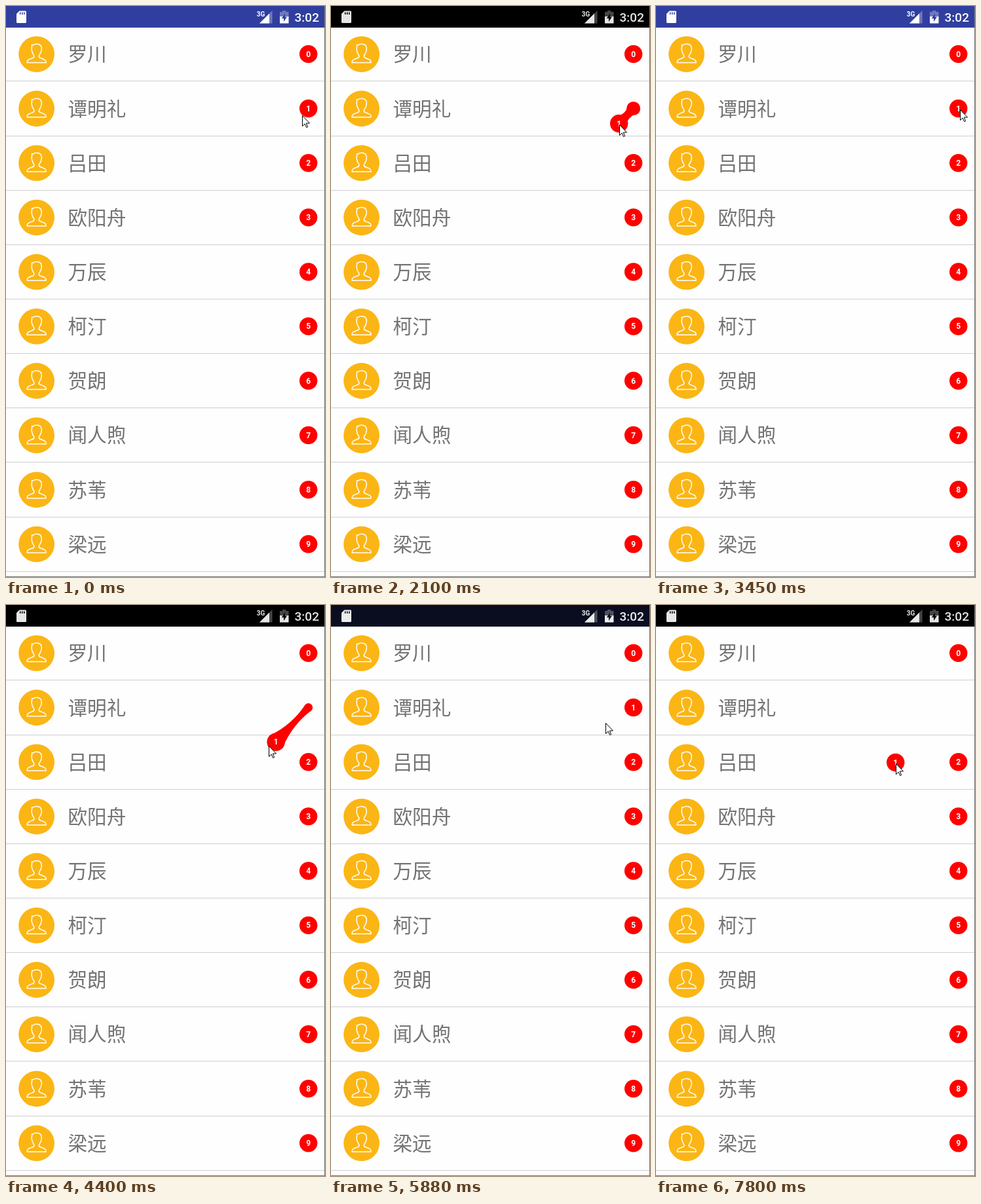
Animation of 487x872 px, one loop 8 s. Source, as an HTML page:

```html
<!DOCTYPE html>
<html lang="zh">
<head>
<meta charset="utf-8">
<style>
  html, body { margin: 0; width: 100%; height: 100%; overflow: hidden; background: #fefefe; }
  svg { display: block; width: 487px; height: 872px; }
  .name { font: 29.6px "Noto Sans CJK SC", "Noto Sans CJK", sans-serif; fill: #737373; }
  .count { font: bold 12px Roboto, sans-serif; fill: #fff; text-anchor: middle; }
  .clock { font: 500 19px Roboto, sans-serif; fill: #fff; }
  .net { font: bold 10px Roboto, sans-serif; fill: #fff; }
</style>
</head>
<body>
<svg viewBox="0 0 487 872">
  <defs>
    <g id="avatar">
      <circle r="27.4" fill="#fbb615"/>
      <path d="M-14.5 13H14.5C14.8 9 12 8 8 6.6C4.5 5.4 3.6 5 3.6 3.2C3.6 1 7.6-1 7.8-8C7.8-13 5-15.6 0-15.6C-2.5-15.6-4-15-5-14H-7.2C-6.4-12.5-7.6-10-7.4-7C-7-1-3.6 1-3.6 3.2C-3.6 5-4.5 5.4-8 6.6C-12 8-14.8 9-14.5 13Z"
        fill="none" stroke="#fff" stroke-width="1.5" stroke-linejoin="round"/>
    </g>
  </defs>
  <rect width="487" height="872" fill="#fefefe"/>
  <rect id="bar" width="487" height="33"/>
  <g id="icons" fill="#fff">
    <path d="M20.5 7.5H29.5Q31 7.5 31 9V24.5Q31 26 29.5 26H17.5Q16 26 16 24.5V12Z"/>
    <path id="slots" d="M21.7 9.5v3.5M24.8 9.5v3.5M27.9 9.5v3.5" stroke-width="1.5"/>
    <text class="net" x="382.8" y="15.5">3G</text>
    <path d="M387 26.5L406.5 7V26.5Z" opacity=".3"/>
    <path d="M387 26.5L402 11.5V26.5Z"/>
    <path d="M418 9H422V7H427.5V9H431.5V16H418Z" opacity=".3"/>
    <path d="M418 16H431.5V26.5H418Z"/>
    <path id="bolt" d="M426 11.5L420.8 19H424V24L429 16.5H426Z"/>
    <text class="clock" x="440.5" y="23.7">3:02</text>
  </g>
  <g id="rows"></g>
  <path d="M486.5 0V872M0 871.5H487" stroke="#777"/>
  <path id="tail" fill="red"/>
  <circle id="anchor" fill="red"/>
  <g id="badge"><circle r="13.7" fill="red"/><text class="count" y="4.2">1</text></g>
  <path id="cursor" d="M.5 .5V16.5L4.2 13L6.6 18.5L8.6 17.7L6.4 12H11.5Z" fill="#fff" stroke="#000"/>
</svg>
<script>
const $ = id => document.getElementById(id);
const LOOP = 8000, TICK = 135, PHASE = 75, LAG = 64;
const PITCH = 83.15, RADIUS = 13.7;
const home = [461.7, 73.4 + PITCH];
const names = ['罗川', '谭明礼', '吕田', '欧阳舟', '万辰', '柯汀', '贺朗', '闻人煦', '苏苇', '梁远'];

$('rows').innerHTML = names.map((name, i) => {
  const y = 73.4 + PITCH * i;
  const count = i === 1 ? '' :
    `<circle cx="${home[0]}" cy="${y}" r="${RADIUS}" fill="red"/><text class="count" x="${home[0]}" y="${y + 4.2}">${i}</text>`;
  return `<use href="#avatar" x="46.6" y="${y + .2}"/>
    <text class="name" x="94.5" y="${y + 11}">${name}</text>${count}
    <rect y="${Math.round(114.4 + PITCH * i)}" width="486" height="1.2" fill="#d4d4d4"/>`;
}).join('');
$('anchor').setAttribute('cx', home[0]);
$('anchor').setAttribute('cy', home[1]);

// key points of the pointer: time, x, y
const path = [[280, 452, 167], [420, 450, 184], [825, 457, 101], [1370, 464, 148], [1830, 462, 153],
  [2035, 440, 181], [2100, 440, 181], [2600, 415, 208], [3045, 415, 208], [3450, 464, 158],
  [3990, 459, 164], [4260, 425, 206], [4395, 401, 215], [4665, 388, 226], [5205, 400, 210],
  [5880, 419, 180], [6285, 471, 157], [6935, 458, 161], [7700, 366, 242]];

const drags = [
  { press: 1830, release: 3045, snap: LOOP },
  { press: 3990, release: 5880, snap: 4500 },
  { press: 6935, release: LOOP, snap: 7500 }
];

const clamp = v => Math.min(1, Math.max(0, v));

// the screen is refreshed at a fixed rate
const refresh = t => Math.max(0, PHASE + TICK * Math.floor((t - PHASE + 5) / TICK));

function pointer(t) {
  const i = path.findIndex(p => p[0] >= t);
  if (i < 0) return path[path.length - 1].slice(1);
  const b = path[i], a = path[i - 1] || b;
  const u = (t - a[0]) / (b[0] - a[0] || 1);
  return [1, 2].map(k => a[k] + (b[k] - a[k]) * u);
}

// the bar darkens on press and recovers after release
function darkness(t) {
  return Math.max(...drags.map(({ press, release }) =>
    t < press ? 0 : t < release ? clamp(.37 + (t - press) / 215) : clamp(.8 - (t - release) / 310)));
}

function tailShape([x, y], r, d) {
  const nx = -(y - home[1]) / d, ny = (x - home[0]) / d;
  const mid = `${(x + home[0]) / 2} ${(y + home[1]) / 2}`;
  const edge = (px, py, s) => `${px + nx * s} ${py + ny * s}`;
  return `M${edge(...home, r)}Q${mid} ${edge(x, y, RADIUS)}L${edge(x, y, -RADIUS)}Q${mid} ${edge(...home, -r)}Z`;
}

function draw(time) {
  const t = refresh(time);
  const dark = darkness(t);
  const shade = `rgb(${[48, 63, 159].map(c => Math.round(c * (1 - dark)))})`;
  $('bar').setAttribute('fill', shade);
  $('slots').setAttribute('stroke', shade);
  $('bolt').setAttribute('fill', shade);
  $('icons').setAttribute('opacity', 1 - .1 * dark);
  $('cursor').setAttribute('transform', `translate(${pointer(t).map(Math.round)})`);

  const drag = drags.find(d => t >= d.press && t < d.release);
  const shown = !drag || t >= drag.press + TICK;
  let pos = home, tail = '', r = 0;
  if (drag) {
    const [x, y] = pointer(t - LAG);
    pos = [x - .3, y - 1.5];
    if (shown && t < drag.snap) {
      const d = Math.hypot(pos[0] - home[0], pos[1] - home[1]);
      r = RADIUS - .1 * d;
      tail = tailShape(pos, r, d);
    }
  }
  $('badge').setAttribute('visibility', shown ? 'visible' : 'hidden');
  $('badge').setAttribute('transform', `translate(${pos})`);
  $('tail').setAttribute('d', tail);
  $('anchor').setAttribute('r', r);
}

const start = performance.now();
function tick() {
  draw((performance.now() - start) % LOOP);
  requestAnimationFrame(tick);
}
tick();
</script>
</body>
</html>
```
